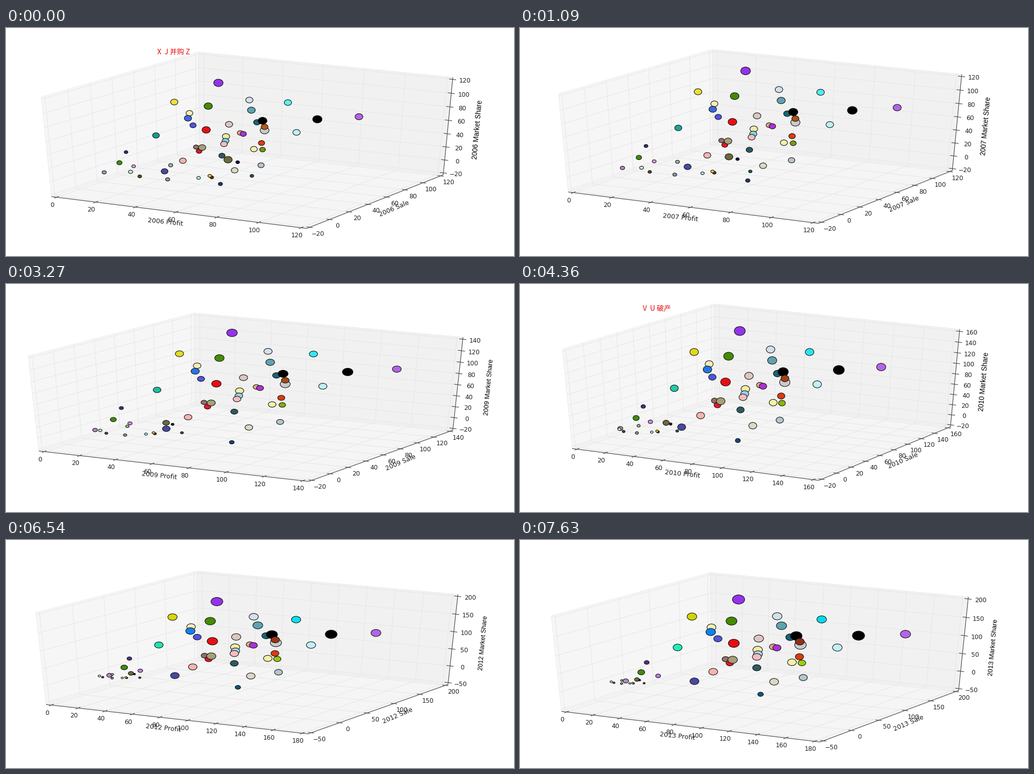
These frames come from a looping animation (1001x451 px, 8000 ms). A matplotlib script:

```python
import math

import numpy as np
import matplotlib.pyplot as plt
from matplotlib.animation import FuncAnimation
from matplotlib.collections import EllipseCollection, LineCollection, PolyCollection
from matplotlib.colors import to_rgb

W, H, DPI = 1001, 451, 64
PX = 72 / DPI                       # points per pixel
LOOP, STEP, HOLD = 8000, 20, 1090   # ms
FIRST, COUNT = 2006, 8
INK = "#202020"

# Box corners in the first year: left, back, right, front; bottom and top
LB, BB, RB, FB = (89, 333), (380, 236), (861, 290), (592, 396)
LT, BT, RT = (69, 136), (379, 47), (880, 97)
LEFT, BACK, FLOOR = (LB, BB, BT, LT), (BB, RB, RT, BT), (LB, FB, RB, BB)

# Left, right, top and bottom of the box in each year
FRAMES = [(69, 880, 47, 396), (75, 870, 42, 386), (71, 875, 40, 386), (43, 900, 57, 390),
          (83, 866, 39, 388), (44, 890, 52, 383), (58, 890, 61, 383), (61, 883, 64, 399)]

# Dots in the first year: x, y, width, colour (or first-last colour)
GROWING = [
    (418, 108, 19, "9333ea"), (331, 146, 15, "f0e03c-d4d400"), (398, 154, 17, "458b00"),
    (361, 168, 14, "f5edb8"), (358, 178, 15, "4266dd-0a85f0"), (368, 192, 13, "4e56de"),
    (295, 212, 14, "1a9a94-1cf0b8"), (394, 201, 17, "e60f12"), (479, 142, 15, "d3dfea"),
    (483, 162, 16, "5fa2b0"), (555, 147, 15, "5cf0f5-00dcee"), (494, 186, 14, "186478"),
    (505, 183, 18, "000000"), (509, 202, 18, "cacaca"), (509, 195, 14, "b85a12-90301a"),
    (613, 180, 19, "000000"), (695, 175, 16, "b464e6"), (572, 206, 15, "bff0f5"),
    (439, 190, 15, "dcc6c4"), (461, 207, 12, "e5a880"), (467, 209, 13, "b030d8"),
    (433, 214, 15, "f0eba4"), (432, 223, 14, "74d8ea-a8d4ee"), (429, 229, 14, "f3bcc0"),
    (503, 227, 13, "dc3a10"), (488, 239, 14, "f5f0a8"), (505, 240, 12, "729600-9cd010"),
    (374, 235, 11, "947068"), (380, 243, 12, "e81428"), (386, 236, 15, "a5a075"),
    (348, 262, 14, "f3b5ac"), (425, 252, 13, "2c5a62"), (502, 271, 13, "b4c6cc"),
    (450, 281, 14, "dcd6c4"), (422, 308, 9, "253070-0a5a7c"), (236, 245, 8, "302f78-55308a"),
    (223, 266, 11, "3c8f0a"), (251, 273, 8, "e8a0f0-c078ee"), (193, 285, 9, "b28cba"),
    (312, 283, 14, "4848a0"),
]
SHRINKING = [
    (437, 260, 17, "6a6b3c"), (456, 265, 8, "10104a"), (484, 292, 8, "1c5a5c"),
    (405, 295, 8, "5a3c10"), (401, 292, 8, "f0c830"), (379, 296, 8, "b8f0f0"),
    (318, 299, 9, "8c98a8"), (324, 271, 9, "98b898"), (263, 293, 8, "4c5010"),
    (245, 284, 9, "d0ecd8"),
]
CAPTIONS = {2006: ("X  J 并购 Z", 330, 48), 2010: ("V  U 破产", 269, 48),
            2011: ("Z  W 与 J  Q 合并", 313, 84)}


def limits(i):
    """End of the profit axis; start, end and step of the other two."""
    top = 120 + 20 * (i // 2)
    step = 20 if top <= 160 else 50
    return top, -step, math.ceil(top / step) * step, step


def view(i):
    """Scale and shift that put the first year's box into year i's place."""
    left, right, top, bottom = FRAMES[i]
    scale = np.array([(right - left) / (RT[0] - LT[0]), (bottom - top) / (FB[1] - BT[1])])
    return scale, np.array([left, top]) - scale * (LT[0], BT[1])


def plane(quad, u, v):
    """Perspective map of the unit square onto a quad."""
    rows, rhs = [], []
    for (a, b), (x, y) in zip([(0, 0), (1, 0), (1, 1), (0, 1)], quad):
        rows += [[a, b, 1, 0, 0, 0, -a * x, -b * x], [0, 0, 0, a, b, 1, -a * y, -b * y]]
        rhs += [x, y]
    h = np.linalg.solve(rows, rhs)
    u, v = np.broadcast_arrays(u, v)
    d = h[6] * u + h[7] * v + 1
    return np.stack([(h[0] * u + h[1] * v + h[2]) / d,
                     (h[3] * u + h[4] * v + h[5]) / d], -1)


def grid(quad, us, vs):
    edge = np.array([0, 1])
    return [plane(quad, u, edge) for u in us] + [plane(quad, edge, v) for v in vs]


def text(pos, s, size, font="DejaVu Sans", va="center", **kw):
    return ax.text(*pos, s, fontsize=size * PX, family=font, ha="center", va=va, **kw)


def draw_box(i):
    scale, shift = view(i)
    place = lambda p: np.asarray(p) * scale + shift
    top, lo, hi, step = limits(i)
    xs, ys = np.arange(0, top + 1, 20), np.arange(lo, hi + 1, step)
    fx, fy = (np.linspace(1 / 48, 47 / 48, len(t)) for t in (xs, ys))

    panes = PolyCollection([place(q) for q in (LEFT, BACK, FLOOR)],
                           facecolors=["#f6f6f6", "#f1f1f1", "#f5f5f5"],
                           edgecolors="#e9e9e9", linewidths=.8 * PX, zorder=1)
    lines = grid(LEFT, fy, fy) + grid(BACK, fx, fy) + grid(FLOOR, fx, fy)
    mesh = LineCollection([place(l) for l in lines], colors="#e7e5e7",
                          linewidths=.9 * PX, zorder=2)

    # values, positions, half a tick mark, label offset
    axes = [(xs, plane(FLOOR, fx, 0), (4.7, -1.8), (-8.5, 14)),
            (ys, plane(FLOOR, 1, fy), (6, .8), (16, 11.5)),
            (ys, plane(BACK, 1, fy), (7, .9), (24.5, 1.5))]
    marks = [place((LB, FB)), place((FB, RB)), place((RB, RT))]
    art = []
    for values, points, half, off in axes:
        for value, p in zip(values, place(points)):
            marks.append([p - half, p + half])
            art.append(text(p + off, str(value).replace("-", "\u2212"), 12.3,
                            va="center_baseline", color=INK))
    frame = LineCollection(marks, colors="#404040", linewidths=1.1 * PX, zorder=3)
    for c in (panes, mesh, frame):
        ax.add_collection(c, autolim=False)

    year = FIRST + i
    art += [text(place((314, 384)), f"{year} Profit", 12.8, rotation=-6, color=INK),
            text(place((764, 357)), f"{year} Sale", 12.6, rotation=23, color=INK),
            text(place((929, 201)), f"{year} Market Share", 13.8 * scale[1],
                 "Liberation Sans", rotation=85)]
    if year in CAPTIONS:
        s, *pos = CAPTIONS[year]
        art.append(text(pos, s, 14, "Noto Sans CJK JP", color="#e40c0c"))
    return art + [panes, mesh, frame]


def data_origin(i):
    """Where the value 0, 0, 0 falls inside the first year's box."""
    _, lo, hi, _ = limits(i)
    t = 1 / 48 + 46 / 48 * -lo / (hi - lo)
    return np.array([99.5, 334]) + t * np.array([280, -290])


def positions(pts, i, factor):
    """Values grow by a factor while the axes widen around them."""
    top, lo, hi, _ = limits(i)
    top0, lo0, hi0, _ = limits(0)
    d = np.array(pts) - data_origin(0)
    profit = d @ [.0019, .0021]
    along = factor * top0 / top
    other = factor * (hi0 - lo0) / (hi - lo)
    scale, shift = view(i)
    moved = other * d + np.outer((along - other) * profit, np.subtract(FB, LB))
    return (data_origin(i) + moved) * scale + shift


def blend(shades, t):
    ends = [np.array(to_rgb("#" + s)) for s in shades.split("-")]
    return ends[0] + (ends[-1] - ends[0]) * t


def draw_dots(i):
    scale, _ = view(i)
    aspect = .79 * scale[1] / scale[0]
    art = []
    # value change and width change per year
    for dots, rate, swell in ((GROWING, .1, .043), (SHRINKING, -.0855, -.057)):
        x, y, w, shades = zip(*dots)
        widths = np.array(w) * (1 + swell * i) - .6
        group = EllipseCollection(
            widths, widths * aspect, np.zeros(len(dots)), units="xy",
            offsets=positions(list(zip(x, y)), i, 1 + rate * i),
            offset_transform=ax.transData,
            facecolors=[blend(s, i / (COUNT - 1)) for s in shades],
            edgecolors="#101010", linewidths=1.1 * PX, zorder=5)
        ax.add_collection(group, autolim=False)
        art.append(group)
    return art


fig = plt.figure(figsize=(W / DPI, H / DPI), dpi=DPI, facecolor="white")
ax = fig.add_axes([0, 0, 1, 1])
ax.set_xlim(-.5, W - .5)
ax.set_ylim(H - .5, -.5)
ax.axis("off")

scenes = [draw_box(i) + draw_dots(i) for i in range(COUNT)]


def update(k):
    now = (k * STEP + STEP // 2) // HOLD
    for i, scene in enumerate(scenes):
        for artist in scene:
            artist.set_visible(i == now)
    return []


anim = FuncAnimation(fig, update, frames=LOOP // STEP, interval=STEP,
                     repeat=True, repeat_delay=0, blit=False)
plt.show()
```
